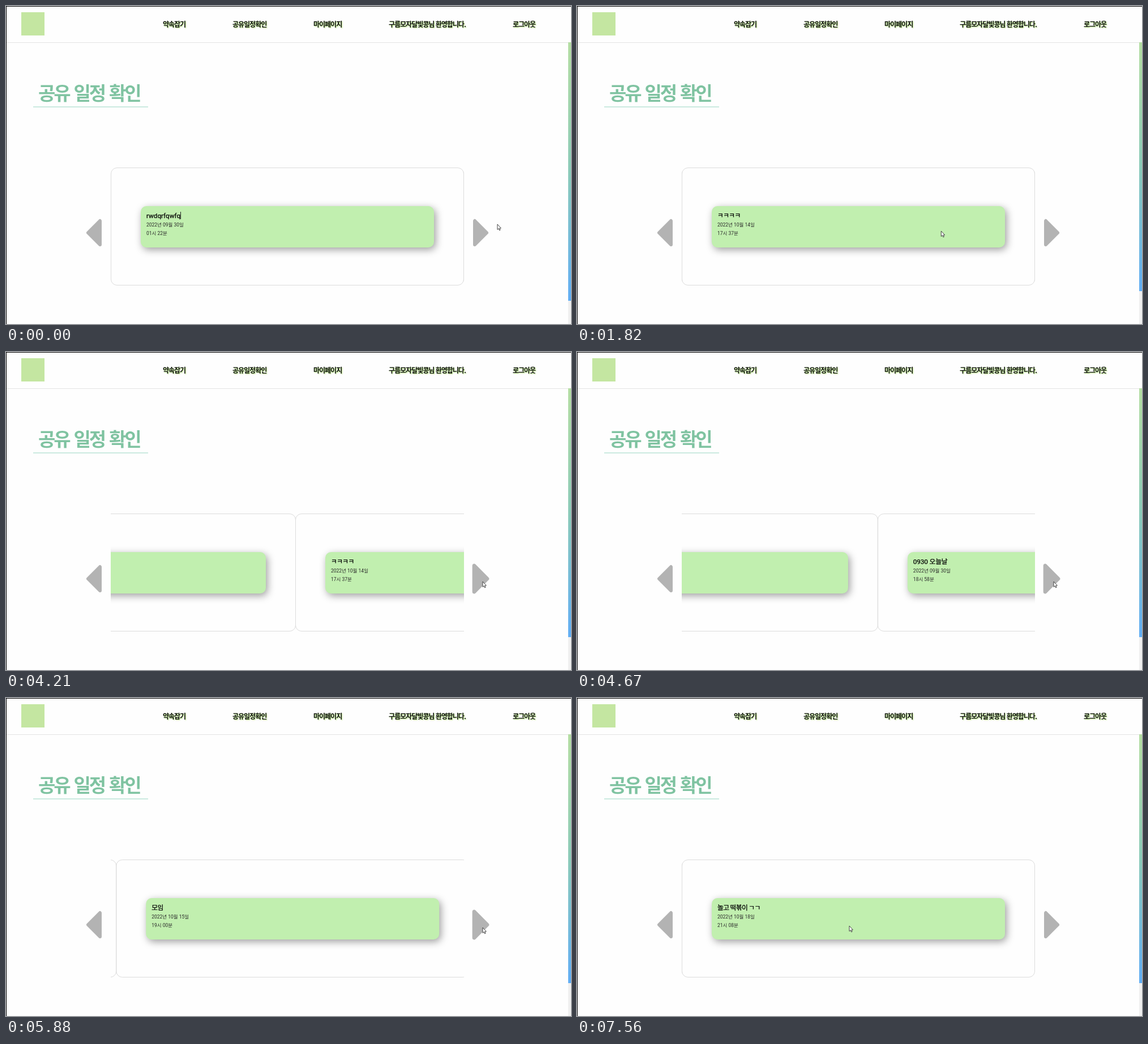
These frames come from a looping animation (998 by 561 pixels, 8 s). An HTML page:

```html
<!DOCTYPE html>
<html lang="ko">
<head>
<meta charset="utf-8">
<style>
  html, body { margin: 0; width: 100%; height: 100%; overflow: hidden; background: #fefefe; }
  body { font-family: Roboto, "Noto Sans CJK KR", "Noto Sans CJK", sans-serif; color: #111; }
  div, svg, span, h1 { position: absolute; box-sizing: border-box; white-space: nowrap; }
  #frame { inset: 0; border: solid #000; border-width: 1px 0 0 1px; }
  #header { left: 1px; right: 0; top: 64px; height: 1px; background: #e4e4e4; }
  #logo { left: 27px; top: 11px; width: 41px; height: 41px; background: #c4e6a1; }
  .nav { top: 22px; font: 700 12px/20px "Noto Sans CJK KR", "Noto Sans CJK", sans-serif;
    letter-spacing: -1px; text-shadow: 1px 1px 2px #aee96f; }
  h1 { left: 57px; top: 132px; margin: 0; color: #7fc3a1;
    font: 700 33px/40px "Noto Sans CJK KR", "Noto Sans CJK", sans-serif;
    letter-spacing: -3px; word-spacing: 1.5px; }
  #rule { left: 48px; top: 177px; width: 203px; height: 2px; background: #cbeae0; }
  #track { left: 993px; top: 64px; width: 5px; bottom: 0; background: #f0f0f0; }
  #thumb { width: 5px; background: linear-gradient(#b5dea3, #8ccbb9 50%, #62aef5); }
  #view { left: 185px; top: 285px; width: 624px; height: 208px; overflow: hidden; }
  .slide { width: 624px; height: 208px; border: 1px solid #dcdcdc; border-radius: 11px; }
  .card { left: 52px; top: 67px; width: 518px; height: 73px; border-radius: 10px;
    background: #c1efaf; box-shadow: 3px 4px 14px rgba(0, 0, 0, .38); }
  .card span { left: 10px; font-size: 8.5px; line-height: 14px; color: #2a2a2a; }
  .card .name { top: 9px; font-size: 11.7px; line-height: 16px; color: #000; -webkit-text-stroke: .25px #000; }
  #caret { left: 308px; top: 363px; width: 1px; height: 13px; background: #222; }
  svg { left: 0; top: 0; }
  .arrow { fill: #b3b3b3; stroke: #b3b3b3; stroke-width: 6; stroke-linejoin: round;
    transform-box: fill-box; transform-origin: center; }
</style>
</head>
<body>
<div id="frame"></div>
<div id="header"></div>
<div id="logo"></div>
<span class="nav" style="left:277px">약속잡기</span>
<span class="nav" style="left:400px">공유일정확인</span>
<span class="nav" style="left:543px">마이페이지</span>
<span class="nav" style="left:676px">구름모자달빛콩님 환영합니다.</span>
<span class="nav" style="left:895px">로그아웃</span>
<h1>공유 일정 확인</h1>
<div id="rule"></div>
<div id="track"><div id="thumb"></div></div>
<div id="view"></div>
<div id="caret"></div>
<svg width="998" height="561">
  <path class="arrow" id="left" d="M166 379V421L145 400Z"/>
  <path class="arrow" id="right" d="M828 379V421L849 400Z"/>
  <path id="cursor" d="M0 0V9.5L2.2 7.6L3.6 10.8L5.1 10.1L3.7 7H6.4Z" fill="#fff" stroke="#333" stroke-width=".9"/>
</svg>
<script>
const LOOP = 8000, STEP = 623, SLIDE_MS = 540, HOVER_MS = 100;
const $ = id => document.getElementById(id);

// title, letter spacing, date, time
const events = [
  ['rwdqrfqwfq', 0, '2022년 09월 30일', '01시 22분'],
  ['저녁 약속', -.6, '2022년 10월 07일', '18시 30분'],
  ['ㅋㅋㅋㅋ', -.6, '2022년 10월 14일', '17시 37분'],
  ['0930 오늘날', -.1, '2022년 09월 30일', '18시 58분'],
  ['모임', -.6, '2022년 10월 15일', '19시 00분'],
  ['놀고 떡볶이 ㄱㄱ', -.6, '2022년 10월 18일', '21시 08분'],
];
const slides = events.map(([name, spacing, date, time]) => {
  const el = document.createElement('div');
  el.className = 'slide';
  el.innerHTML = `<div class="card"><span class="name" style="letter-spacing:${spacing}px">${name}</span>
    <span style="top:26px">${date}</span><span style="top:41px">${time}</span></div>`;
  return $('view').appendChild(el);
});

// start time and direction of each slide change
const moves = [[590, 1], [1120, 1], [3019, -1], [3949, 1], [4420, 1], [5383, 1], [6360, 1]];
// time, x, y of the pointer
const path = [
  [0, 868, 385], [60, 868, 385], [430, 842, 405], [1200, 842, 405], [1380, 815, 402],
  [1820, 644, 397], [2250, 330, 402], [2500, 167, 406], [3130, 167, 406], [3280, 832, 394],
  [3440, 924, 391], [3650, 890, 398], [3870, 842, 405], [7300, 842, 405], [7560, 481, 402], [LOOP, 481, 402],
];

const clamp = v => Math.max(0, Math.min(1, v));
const ease = v => (1 - Math.cos(Math.PI * clamp(v))) / 2;
const hover = (t, from, to) => clamp((t - from) / HOVER_MS) - clamp((t - to) / HOVER_MS);
const grow = (id, amount) => $(id).style.transform = `scale(${1 + .1 * amount})`;

function pointer(t) {
  const i = path.findIndex(p => p[0] > t);
  const [t0, x0, y0] = path[i - 1], [t1, x1, y1] = path[i];
  const k = (t - t0) / (t1 - t0);
  return [x0 + (x1 - x0) * k, y0 + (y1 - y0) * k];
}

function draw(now) {
  const t = now % LOOP;
  const at = moves.reduce((sum, [start, dir]) => sum + dir * ease((t - start) / SLIDE_MS), 0);
  slides.forEach((el, i) => el.style.transform = `translateX(${(i - at) * STEP}px)`);
  grow('left', hover(t, 2440, 3140));
  grow('right', hover(t, 330, 1230) + hover(t, 3850, 7330));
  $('cursor').setAttribute('transform', `translate(${pointer(t)})`);
  $('caret').hidden = t >= 250;
  $('thumb').style.height = (t < 610 ? 456 : 439) + 'px';
  requestAnimationFrame(draw);
}
requestAnimationFrame(draw);
</script>
</body>
</html>
```
